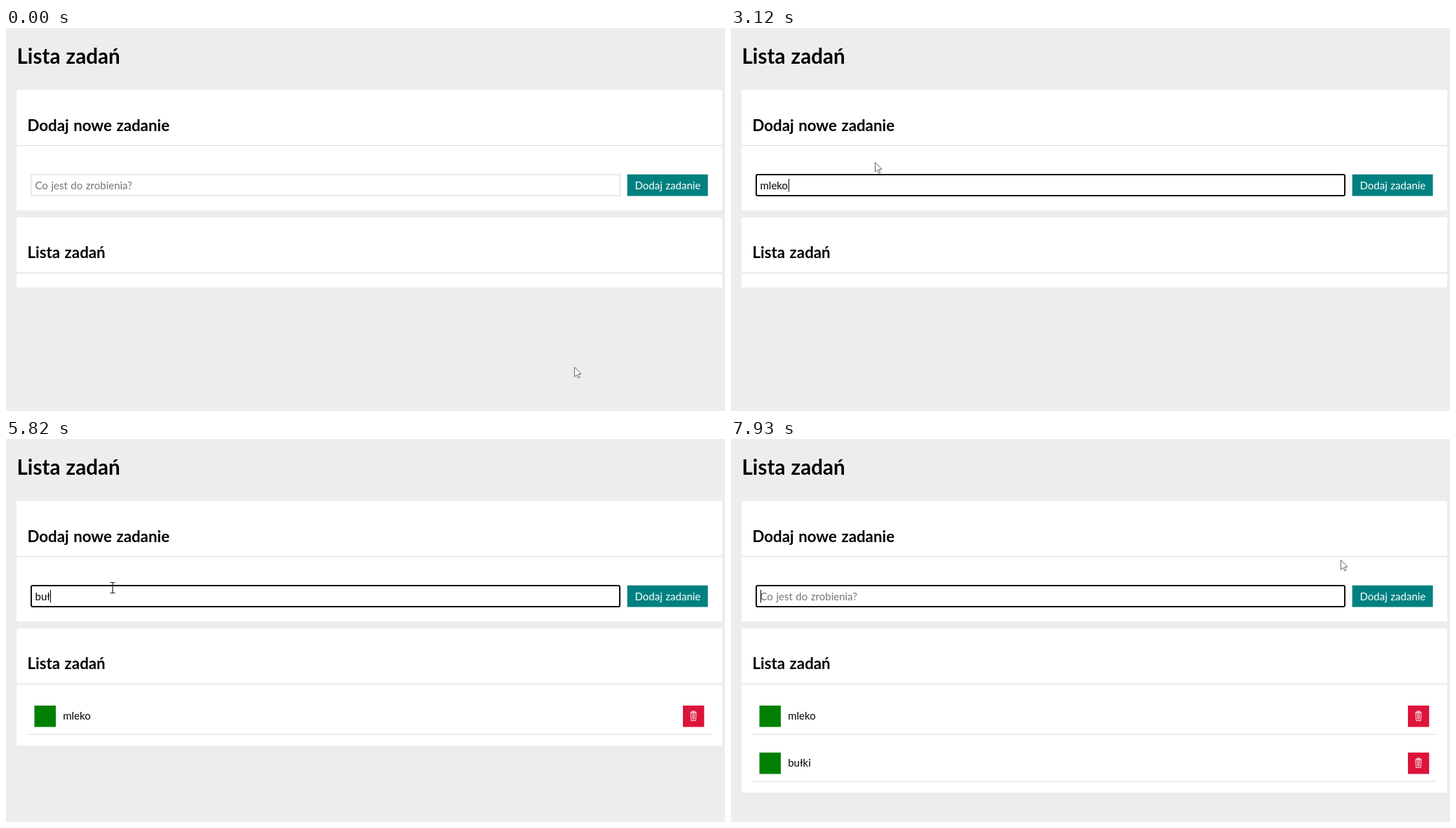
Write an HTML page that moves like this. It is 1025 by 546 pixels and loops after 8000 ms.

```html
<!DOCTYPE html>
<html lang="pl">
<head>
<meta charset="utf-8">
<title>Lista zadań</title>
<style>
  html, body { margin: 0; width: 100%; height: 100%; overflow: hidden; background: #ededed; }
  svg { display: block; font: 15px Lato, sans-serif; word-spacing: .7px; }
  .title { font-size: 29.6px; font-weight: 700; word-spacing: 1px; }
  .head { font-size: 22.3px; font-weight: 700; word-spacing: 1px; }
  .panel { fill: #fff; }
  .rule { fill: #dedede; }
  #field { fill: #fff; stroke: #dedede; stroke-width: 1.3px; }
  #field.focus { stroke: #101010; stroke-width: 2px; rx: 2px; }
  #value { fill: #000; }
  #value.hint { fill: #757575; }
  #button { fill: #008080; }
  #button.hover { fill: #009999; }
</style>
</head>
<body>
<svg width="1025" height="546" viewBox="0 0 1025 546">
  <defs>
    <g id="row">
      <rect x="40.5" y="380" width="30.5" height="30.5" fill="green"/>
      <rect x="965" y="380" width="30.3" height="30.5" fill="crimson"/>
      <g fill="none" stroke="#fff" stroke-width=".9">
        <path d="M975.5 389.5h9M978 389v-1h4v1M976 391l.8 10.5h6.4L984 391z"/>
        <path d="M978.6 392l.3 8M980 392v8M981.4 392l-.3 8" stroke-width=".7"/>
      </g>
      <rect class="rule" x="30.5" y="420.5" width="975" height="1.2"/>
    </g>
  </defs>
  <rect width="1025" height="546" fill="#ededed"/>
  <text class="title" x="15.5" y="51">Lista zadań</text>

  <rect class="panel" x="15.3" y="88.5" width="1005.7" height="171.5"/>
  <text class="head" x="30.5" y="147">Dodaj nowe zadanie</text>
  <rect class="rule" x="15.3" y="167" width="1005.7" height="1.2"/>
  <rect id="field" x="36" y="209" width="839" height="30"/>
  <text id="value" x="41.5" y="229.5"></text>
  <rect id="caret" y="215" width="1" height="18.5"/>
  <rect id="button" x="885.6" y="208.7" width="115" height="30.8"/>
  <text x="896.5" y="229.5" fill="#fff">Dodaj zadanie</text>

  <rect id="list" class="panel" x="15.3" y="270" width="1005.7"/>
  <text class="head" x="30.5" y="328">Lista zadań</text>
  <rect class="rule" x="15.3" y="348.7" width="1005.7" height="1.2"/>
  <g id="items"></g>

  <path id="arrow" d="M.5.5V14.3L3.7 11.3 5.8 15.9 7.9 15 5.8 10.4H10Z" fill="#fff" stroke="#555" stroke-width=".9"/>
  <path id="beam" d="M-3.5-7.5H-1Q0-7.5 0-6.5Q0-7.5 1-7.5H3.5M0-7V7M-3.5 7.5H-1Q0 7.5 0 6.5Q0 7.5 1 7.5H3.5" fill="none" stroke="#222" stroke-width="1.2"/>
</svg>
<script>
const LOOP = 8000, STEP = 67, BLINK = 500, FOCUS = 1020, ROW = 67;
const el = id => document.getElementById(id);
const show = (id, on) => el(id).setAttribute('visibility', on ? 'visible' : 'hidden');

// Each task is typed at an even pace, then added with a click
const tasks = [
  { text: 'mleko', type: 1920, gap: 200, press: 4015, add: 4150 },
  { text: 'bułki', type: 5220, gap: 260, press: 7580, add: 7720 }
];

el('items').innerHTML = tasks.map(({ text }, i) =>
  `<g transform="translate(0 ${i * ROW})"><use href="#row"/><text x="81.2" y="400.3">${text}</text></g>`).join('');

// Pointer moves, each bending towards a point on its way to the next stop
const home = [810, 483];
const moves = [
  { start: 70, end: 610, bend: [110, 55], to: [196, 222] },
  { start: 890, end: 1310, bend: [197, 230], to: [201, 192] },
  { start: 3120, end: 3880, bend: [560, 140], to: [919, 226] },
  { start: 4200, end: 4760, bend: [535, 226], to: [152, 212] },
  { start: 6700, end: 7358, bend: [542, 270], to: [920, 227] },
  { start: 7720, end: 7930, bend: [915, 205], to: [869, 172] }
];

const ease = p => p ** 3 * (6 * p * p - 15 * p + 10);

function pointer(t) {
  let pos = home;
  for (const { start, end, bend, to } of moves) {
    if (t < start) break;
    const steps = Math.floor((t - start) / STEP) + 1;
    const u = ease(Math.min(1, steps * STEP / (end - start)));
    pos = pos.map((from, i) => from * (1 - u) ** 2 + 2 * u * (1 - u) * bend[i] + to[i] * u * u);
  }
  return pos;
}

function entry(t) {
  const count = tasks.filter(task => t >= task.add).length;
  const since = count ? tasks[count - 1].add : FOCUS;
  const task = tasks[count];
  if (!task || t < task.type) return { count, since, text: '', focus: t >= FOCUS };
  const keys = Math.min(task.text.length, Math.floor((t - task.type) / task.gap) + 1);
  return {
    count,
    text: task.text.slice(0, keys),
    since: task.type + (keys - 1) * task.gap,
    focus: t < task.press
  };
}

const inside = (x, y, left, right) => x >= left && x <= right && y >= 209 && y <= 239.5;

function draw(t) {
  const { count, text, since, focus } = entry(t);
  const value = el('value');
  value.textContent = text || 'Co jest do zrobienia?';
  value.classList.toggle('hint', !text);
  el('field').classList.toggle('focus', focus);
  show('caret', focus && Math.floor((t - since) / BLINK) % 2 === 0);
  el('caret').setAttribute('x', 42 + Math.round(text && value.getComputedTextLength()));

  el('list').setAttribute('height', 100 + count * ROW);
  [...el('items').children].forEach((item, i) => item.setAttribute('visibility', i < count ? 'visible' : 'hidden'));

  const [x, y] = pointer(t);
  const overField = inside(x, y, 36, 875);
  el('button').classList.toggle('hover', inside(x, y, 886, 1000));
  show('beam', overField);
  show('arrow', !overField);
  el(overField ? 'beam' : 'arrow').setAttribute('transform', `translate(${Math.round(x)} ${Math.round(y)})`);
}

const begin = performance.now();
function frame() {
  draw((performance.now() - begin) % LOOP);
  requestAnimationFrame(frame);
}
frame();
</script>
</body>
</html>
```
